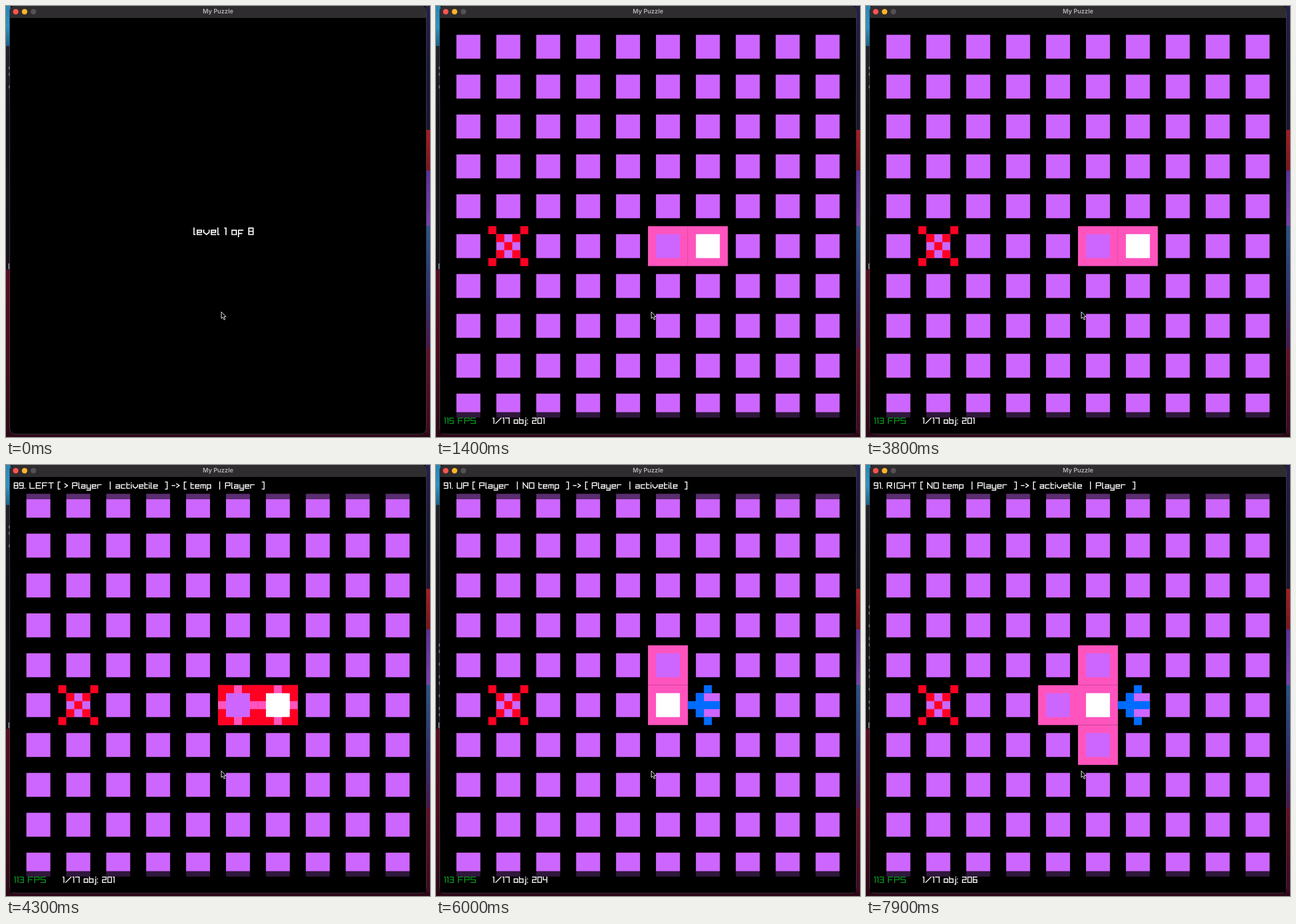
An HTML page with a canvas that plays this animation: 742x755 px, repeating every 8000 ms.

```html
<!DOCTYPE html>
<html lang="en">
<head>
<meta charset="utf-8">
<title>My Puzzle</title>
<style>
html, body { margin: 0; width: 100%; height: 100%; overflow: hidden; background: #000; }
canvas { display: block; }
</style>
</head>
<body>
<canvas id="stage" width="742" height="755"></canvas>
<script>
const ctx = document.getElementById('stage').getContext('2d');
const PX = 13.97, CELL = PX * 5, LEFT = 21.75, TOP = 36.45;
const PURPLE = '#cd66ff', PINK = '#ff54bd', RED = '#ff0022', BLUE = '#006bff';

// Stroke font: width in units, then a path on a grid seven units high
const GLYPHS = {
  0: [5, 'M0 0H4V6H0Z'], 1: [2, 'M0 0H1V6'], 2: [5, 'M0 0H4V3H0V6H4'],
  3: [5, 'M0 0H4V6H0M1 3H4'], 4: [5, 'M0 0V3H4M4 0V6'], 5: [5, 'M4 0H0V3H4V6H0'],
  6: [5, 'M4 0H0V6H4V3H0'], 7: [5, 'M0 0H4V6'], 8: [5, 'M0 0H4V6H0ZM0 3H4'],
  9: [5, 'M4 3H0V0H4V6H0'],
  a: [5, 'M0 2H4V6H0V4H4'], b: [5, 'M0 0V6H4V2H0'], c: [5, 'M4 2H0V6H4'],
  e: [5, 'M4 6H0V2H4V4H0'], f: [5, 'M0 8V2H4M0 5H3'], i: [1, 'M0 2V6M0 0V.1'],
  j: [2, 'M1 2V8H0M1 0V.1'], l: [2, 'M0 0V6H1'], m: [6, 'M0 6V2H5V6M2.5 2V6'],
  o: [5, 'M0 2H4V6H0Z'], p: [5, 'M0 8V2H4V6H0'], r: [5, 'M0 6V2H4'],
  t: [4, 'M0 0V6H3M0 2H3'], v: [6, 'M0 2V4L2.5 6L5 4V2'], y: [5, 'M0 2V6H4M4 2V8H0'],
  D: [6, 'M0 0H4L5 1V5L4 6H0Z'], E: [6, 'M5 0H0V6H5M0 3H4'], F: [6, 'M0 6V0H5M0 3H4'],
  G: [7, 'M6 0H0V6H6V3H4'], H: [7, 'M0 0V6M6 0V6M0 3H6'], I: [3, 'M1 0V6'],
  L: [6, 'M0 0V6H5'], N: [6, 'M0 6V0L5 6V0'], O: [6, 'M0 0H5V6H0Z'],
  P: [6, 'M0 6V0H5V3H0'], R: [6, 'M0 6V0H5V3H0M2 3L5 6'], S: [6, 'M5 0H0V3H5V6H0'],
  T: [6, 'M0 0H5M2.5 0V6'], U: [6, 'M0 0V6H5V0'], W: [6, 'M0 0V6H5V0M2.5 2V6'],
  '.': [1, 'M0 6V6.1'], ':': [1, 'M0 2V2.1M0 6V6.1'], '/': [7, 'M0 6L6 0'],
  '-': [4, 'M0 3H3'], '>': [4, 'M0 1L3 3L0 5'], '|': [3, 'M1 -1V7'],
  '[': [3, 'M2 -1H0V7H2'], ']': [3, 'M0 -1H2V7H0'], ' ': [2.5, '']
};

// Cells are "column row" pairs
const STEPS = [
  { t: 300, pink: '55 65', red: '', player: 6, count: 201, log: 108 },
  { t: 4100, pink: '55 65', red: '55 65', player: 6, count: 201, log: 108,
    rule: '89. LEFT [ > Player  | activetile  ] -> [ temp  | Player  ]' },
  { t: 4800, pink: '55 65', red: '65', player: 5, temp: true, count: 202, log: 402,
    rule: '90. RIGHT [ Player  | activetile  ] -> [ Player  | temp  ]' },
  { t: 5400, pink: '55', red: '54', player: 5, temp: true, count: 203, log: 347,
    rule: '91. UP [ Player  | NO temp  ] -> [ Player  | activetile  ]' },
  { t: 6000, pink: '55 54', red: '', player: 5, temp: true, count: 204, log: 315,
    rule: '91. UP [ Player  | NO temp  ] -> [ Player  | activetile  ]' },
  { t: 6300, pink: '55 54', red: '56', player: 5, temp: true, count: 204, log: 315,
    rule: '91. DOWN [ Player  | NO temp  ] -> [ Player  | activetile  ]' },
  { t: 6900, pink: '55 54 56', red: '', player: 5, temp: true, count: 205, log: 281,
    rule: '91. DOWN [ Player  | NO temp  ] -> [ Player  | activetile  ]' },
  { t: 7200, pink: '55 54 56', red: '45', player: 5, temp: true, count: 205, log: 281,
    rule: '91. RIGHT [ NO temp  | Player  ] -> [ activetile  | Player  ]' },
  { t: 7600, pink: '55 54 56 45', red: '', player: 5, temp: true, count: 206, log: 248,
    rule: '91. RIGHT [ NO temp  | Player  ] -> [ activetile  | Player  ]' }
];
const FPS = [[1400, 115], [1500, 114], [1600, 113], [1700, 114], [1800, 112], [1900, 114],
  [2000, 113], [2400, 114], [3300, 113], [3500, 114], [3600, 112], [3700, 114], [3800, 113],
  [4200, 114], [4300, 113], [4600, 112], [4900, 114], [5000, 113], [6400, 112], [6500, 114],
  [6600, 113], [6700, 114], [7300, 113], [7700, 114], [7900, 113]];

function rect(color, x, y, w, h) {
  ctx.fillStyle = color;
  ctx.fillRect(x, y, w, h);
}

function fade(x, y, w, h, ...colors) {
  const g = ctx.createLinearGradient(0, y, 0, y + h);
  colors.forEach((c, i) => g.addColorStop(i / (colors.length - 1), c));
  rect(g, x, y, w, h);
}

function write(text, x, y, unit, color) {
  ctx.save();
  ctx.translate(x, y);
  ctx.scale(unit, unit);
  ctx.translate(.5, .5);
  ctx.strokeStyle = color;
  ctx.lineWidth = 1;
  ctx.lineCap = 'square';
  for (const ch of text) {
    const [width, path] = GLYPHS[ch];
    ctx.stroke(new Path2D(path));
    ctx.translate(width + 1, 0);
  }
  ctx.restore();
}

// Fill a block of sub-pixels inside a cell
function block(color, col, row, x, y, w = 1, h = 1) {
  rect(color, LEFT + col * CELL + x * PX, TOP + row * CELL + y * PX, w * PX, h * PX);
}

const cells = list => list ? list.split(' ').map(s => [+s[0], +s[1]]) : [];

function desktop(log) {
  fade(0, 0, 8, 72, '#2787b8', '#2b94c4', '#1b5f86');
  fade(0, 70, 8, 393, '#20242a', '#111418', '#15141b', '#160f18');
  fade(0, 462, 8, 293, '#5a0a22', '#4a0a1e', '#2a0816');
  fade(734, 0, 8, 217, '#23204a', '#1a1a38', '#17172f');
  fade(734, 217, 8, 72, '#a81c22', '#7c141e');
  fade(734, 288, 8, 97, '#58309a', '#7a3fae');
  fade(734, 385, 8, 215, '#2a5488', '#2c3476', '#4a1650');
  fade(734, 600, 8, 155, '#64102a', '#3a0a1e');
  rect('#2c0817', 0, 749, 742, 6);
  for (let i = 0, y = log; y < 440 && (log > 200 || i < 4); y = log + 11.1 * ++i)
    if ([0, 1, 3].includes(i % 5)) rect('#8f9296', 5, y - 2, 2, 5);
  rect('#7c8084', 4, 451, 2, 10);
}

function frameWindow() {
  ctx.beginPath();
  ctx.roundRect(6.5, -.5, 729, 750.5, 10);
  ctx.fillStyle = '#000';
  ctx.fill();
  ctx.strokeStyle = '#3c3a3c';
  ctx.lineWidth = 1;
  ctx.stroke();
  ctx.beginPath();
  ctx.roundRect(7, 0, 728, 21, [9, 9, 0, 0]);
  ctx.fillStyle = '#2f2c2f';
  ctx.fill();
  ['#ff544d', '#ffb429', '#535153'].forEach((color, i) => {
    ctx.beginPath();
    ctx.arc(17 + i * 15.5, 10, 4.8, 0, 7);
    ctx.fillStyle = color;
    ctx.fill();
  });
  ctx.font = '600 10.7px Inter, sans-serif';
  ctx.textAlign = 'center';
  ctx.fillStyle = '#b6b4b6';
  ctx.fillText('My Puzzle', 371, 13.4);
}

function board(s) {
  for (const [c, r] of cells(s.pink)) block(PINK, c, r, 0, 0, 5, 5);
  for (let i = 0; i < 100; i++) block(PURPLE, i % 10, i / 10 | 0, 1, 1, 3, 3);
  for (let i = 0; i < 5; i++) {
    block(RED, 1, 5, i, i);
    if (i !== 2) block(RED, 1, 5, i, 4 - i);
  }
  block('#fff', s.player, 5, 1, 1, 3, 3);
  for (const [c, r] of cells(s.red))
    for (const y of [0, 4])
      for (const x of [0, 4]) {
        block(RED, c, r, x ? 3 : 0, y, 2, 1);
        block(RED, c, r, x, y ? 3 : 0, 1, 2);
      }
  if (s.temp) {
    block(BLUE, 6, 5, 0, 2, 4, 1);
    for (const d of [1, 2]) {
      block(BLUE, 6, 5, d, 2 - d);
      block(BLUE, 6, 5, d, 2 + d);
    }
    for (const y of [1, 3]) block(BLUE, 6, 5, 1, y);
  }
}

function pointer() {
  const arrow = new Path2D('M376.8 535.8v11.6l2.6-2.4 2.1 4.7 2-.9-2-4.5h3.4z');
  ctx.fillStyle = '#000';
  ctx.fill(arrow);
  ctx.strokeStyle = '#fff';
  ctx.lineWidth = 1;
  ctx.stroke(arrow);
}

function draw(t) {
  const step = STEPS.findLast(s => s.t <= t);
  const fps = FPS.findLast(f => f[0] <= t);
  desktop(step ? step.log : 108);
  frameWindow();
  if (step) board(step);
  else write('level 1 of 8', 328, 388, 1.9, '#fff');
  if (step && step.rule) {
    rect('rgba(0,0,0,.56)', 7, 21, 728, 39);
    write(step.rule, 13.6, 30.5, 1.57, '#fff');
  }
  if (fps) {
    rect('rgba(0,0,0,.77)', 7, 711.5, 728, 37);
    write(fps[1] + ' FPS', 14, 721, 1.57, '#0a9220');
    write('1/17 obj: ' + step.count, 99, 721, 1.57, '#fff');
  }
  pointer();
}

const start = performance.now();
(function tick() {
  draw((performance.now() - start) % 8000);
  requestAnimationFrame(tick);
})();
</script>
</body>
</html>
```
